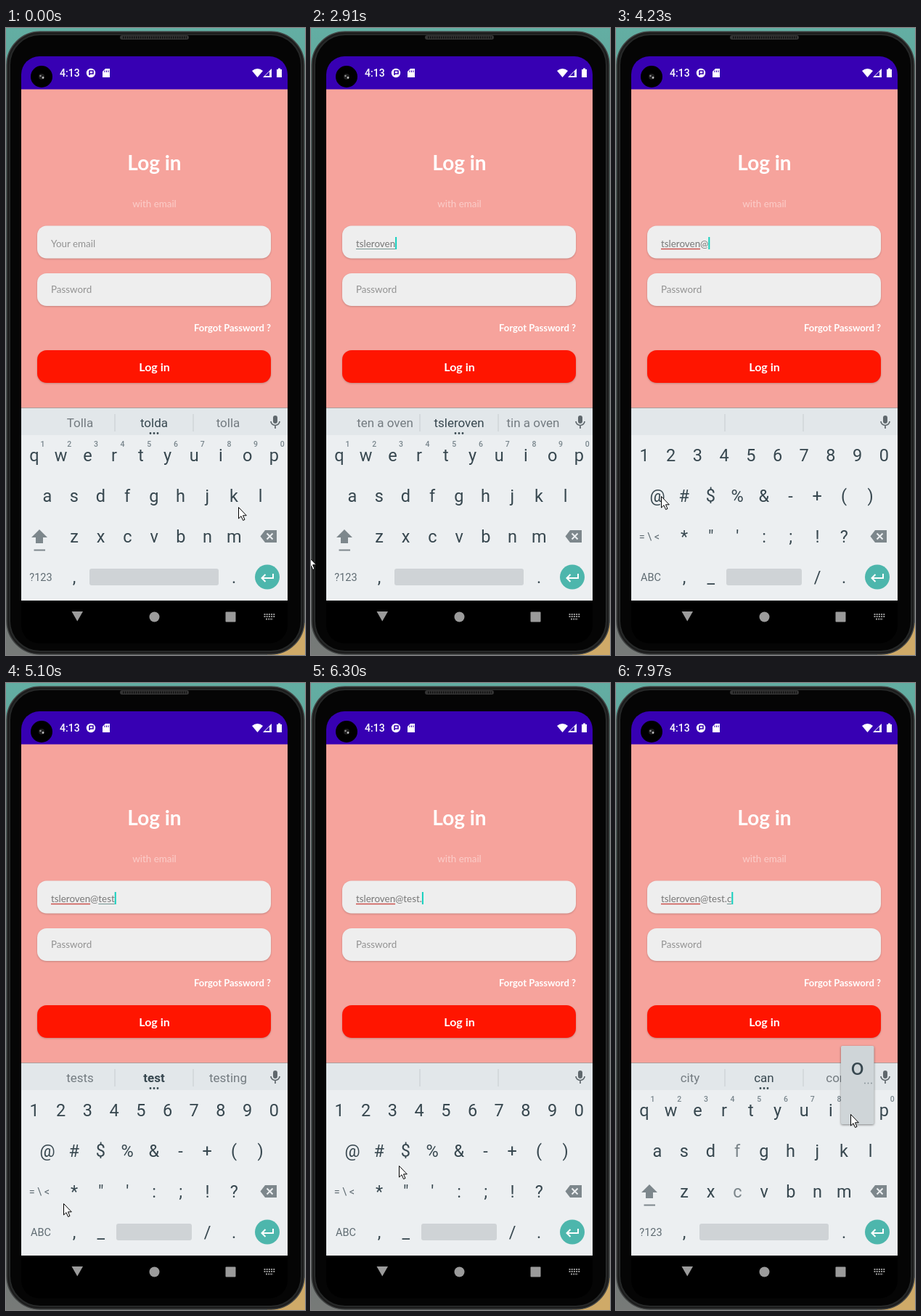
These frames come from a looping animation (412 by 864 pixels, 8 s). An HTML page:

```html
<!DOCTYPE html>
<html lang="en">
<head>
<meta charset="utf-8">
<title>Log in</title>
<style>
  html, body { margin: 0; width: 100%; height: 100%; overflow: hidden; background: #000; }
  svg { display: block; width: 412px; height: 864px; }
  text { font-family: Roboto, sans-serif; white-space: pre; }
  .form text { font-family: Lato, sans-serif; font-size: 13.4px; }
  .mid { text-anchor: middle; }
  .key { font-size: 23.5px; fill: #37474f; text-anchor: middle; }
  .hint { font-size: 10.5px; font-weight: 500; fill: #78858c; text-anchor: middle; }
  .small { font-size: 14.5px; fill: #5f6b72; text-anchor: middle; }
  .sugg { font-size: 17px; fill: #737b80; text-anchor: middle; }
  .field { fill: #eee; filter: drop-shadow(0 1px 1px #0003); }
</style>
</head>
<body>
<svg viewBox="0 0 412 864">
  <defs>
    <linearGradient id="desk" x2="0" y2="1">
      <stop stop-color="#63aea3"/><stop offset=".6" stop-color="#5c7773"/><stop offset="1" stop-color="#777a78"/>
    </linearGradient>
    <clipPath id="screen"><rect x="21" y="39" width="367" height="809" rx="25"/></clipPath>
  </defs>

  <!-- desk and phone body -->
  <rect width="412" height="864" fill="url(#desk)"/>
  <path d="M360 820H412V864H360Z" fill="#cfaa68"/>
  <rect x="1" y="5" width="410" height="858" rx="46" fill="#1c1c1c" stroke="#414444" stroke-width="1.5"/>
  <rect x="5" y="9" width="402" height="850" rx="42" fill="#050505" stroke="#262828" stroke-width="2"/>
  <rect x="157" y="10" width="95" height="6" rx="3" fill="#333"/>
  <path d="M161 13H249" stroke="#111" stroke-width="3" stroke-dasharray="1.5 1.5"/>

  <g clip-path="url(#screen)">
    <rect x="21" y="39" width="367" height="809"/>
    <rect x="21" y="39" width="367" height="46" fill="#3700b3"/>
    <rect x="21" y="84.5" width="367" height="439" fill="#f6a39c"/>
    <rect x="21" y="523.5" width="367" height="38" fill="#e2e7ea"/>
    <rect x="21" y="561" width="367" height="228" fill="#eceff1"/>
  </g>

  <!-- status bar -->
  <circle cx="49" cy="67" r="15"/>
  <circle cx="49" cy="67" r="4" fill="#1f1f1f"/>
  <circle cx="47.500" cy="66" r="1.200" fill="#999"/>
  <circle cx="51" cy="68.500" r="1.400" fill="#bbb"/>
  <g fill="#fff">
    <text x="74" y="67" font-size="14" font-weight="500">4:13</text>
    <circle cx="117" cy="62" r="6.200"/>
    <path d="M137 56H143V68H133V60Z"/>
    <path d="M339 59Q346.500 53 354 59L346.500 68Z"/>
    <path d="M366 56V68H354Z"/>
    <path d="M375 55.500H378V57H380V68H373V57H375Z"/>
  </g>
  <path d="M115 58.500V65M115 59H120V63H115" fill="none" stroke="#3700b3" stroke-width="1.600"/>
  <path d="M136 58.500V61M138.500 58.500V61M141 58.500V61" stroke="#3700b3"/>
  <path d="M363 60V66H357Z" fill="#3700b3"/>

  <g class="form">
    <text class="mid" x="204.500" y="196" fill="#fff" style="font-size:28px;font-weight:700">Log in</text>
    <text class="mid" x="204.500" y="247" fill="#fbcdc9">with email</text>
    <rect class="field" x="43" y="272.500" width="322" height="45" rx="13"/>
    <rect class="field" x="43" y="338" width="322" height="45" rx="13"/>
    <text id="email" x="62" y="302"></text>
    <path id="spell" stroke="#c9504c" stroke-width="1.500"/>
    <path id="compose" stroke="#71918e"/>
    <rect id="caret" y="288" width="2" height="17" fill="#13cfbd"/>
    <text x="62" y="365" fill="#929292">Password</text>
    <text x="365" y="418" fill="#fff" text-anchor="end" style="font-size:13px;font-weight:700">Forgot Password ?</text>
    <rect class="field" x="43" y="444" width="322" height="45" rx="13" style="fill:#ff1500"/>
    <text class="mid" x="204.500" y="473" fill="#fff" style="font-size:16px;font-weight:700">Log in</text>
  </g>

  <!-- suggestion strip -->
  <path d="M150 532V556M258 532V556" stroke="#c6cccf"/>
  <text class="sugg" x="102" y="550"></text>
  <text class="sugg" x="204" y="550" style="fill:#37474f"></text>
  <text class="sugg" x="306" y="550"></text>
  <path id="dots" d="M199 558.500h0m5 0h0m5 0h0" stroke="#37474f" stroke-width="2.800" stroke-linecap="round"/>
  <rect x="368" y="534" width="6" height="11" rx="3" fill="#5f686d"/>
  <path d="M365 542a6 5.500 0 0 0 12 0M371 547.500V552" fill="none" stroke="#5f686d" stroke-width="1.700"/>

  <g id="letters"></g>
  <g id="symbols"></g>

  <!-- keys on both layouts -->
  <path d="M357 692H373V709H357L350.500 700.500Z" fill="#7d878c"/>
  <path d="M359.500 696.500l8 8m0-8l-8 8" stroke="#eceff1" stroke-width="2"/>
  <circle cx="360" cy="756.500" r="17" fill="#4db6ac"/>
  <path d="M368 752V758H353M357.500 753L352.500 758L357.500 763" fill="none" stroke="#fff" stroke-width="2"/>

  <!-- navigation bar -->
  <g fill="#9b9b9b">
    <path d="M90.500 804H106L98.250 817.500Z"/>
    <circle cx="204.500" cy="811.500" r="7"/>
    <rect x="302.500" y="804.500" width="14" height="14" rx="1"/>
    <path d="M355.500 808H370.500M355.500 811H370.500M358 814.500H368" stroke="#9b9b9b" stroke-width="1.800" stroke-dasharray="2 1.200"/>
  </g>

  <g id="popup">
    <rect x="-22.500" y="-89" width="45.500" height="108" rx="2" fill="#cfd5d8" style="filter:drop-shadow(0 1px 1.500px #0007)"/>
    <text class="key" y="-49" style="font-size:32px"></text>
    <path d="M10.500 -37.500h0m4.500 0h0m4.500 0h0" stroke="#849096" stroke-width="1.800" stroke-linecap="round"/>
  </g>
  <path id="pointer" d="M.5 .5V16L4 12.700L6.600 18.500L9 17.400L6.500 11.800H11.300Z" fill="#fff" stroke="#000"/>
</svg>

<script>
const LOOP = 8000, PITCH = 36.7;
const $ = id => document.getElementById(id);
const safe = s => s.replace(/&/g, '&amp;').replace(/</g, '&lt;');
const label = (cls, x, y, s) => `<text class="${cls}" x="${x}" y="${y}">${safe(s)}</text>`;
const row = (chars, x, y, cls = 'key') =>
  [...chars].map((c, i) => label(cls, x + i * PITCH, y, c)).join('');
const space = (x, w) => `<rect x="${x}" y="745" width="${w}" height="23" rx="3" fill="#cfd3d6"/>`;

$('letters').innerHTML = row('qwertyuiop', 39, 597) + row('1234567890', 50.5, 577, 'hint') +
  row('asdfghjkl', 57, 653) + row('zxcvbnm', 94, 709) + label('small', 48, 762, '?123') +
  row(',', 94, 765) + row('.', 314, 765) + space(115, 178) +
  '<path d="M46 691L57 702H51V710H41V702H35Z" fill="#7d878c"/>' +
  '<path d="M38.500 719.500H54" stroke="#7d878c" stroke-width="2"/>';
$('symbols').innerHTML = row('1234567890', 39, 597) + row('@#$%&-+()', 57, 653) +
  row('*"\':;!?', 94, 709) + label('small', 46, 706, '= \\ <') + label('small', 48, 762, 'ABC') +
  row(',_', 94, 765) + row('/.', 277.5, 765) + space(152, 104);

// Typing: [time, text or null to keep it, suggestions or null to keep them]
const NAME = 'tsleroven';
const events = [[0, '', 'Tolla|tolda|tolla'], [720, '', '||']];
const guesses = ['I|t|the', 'TS|ts|its', 'TSL|tsl|tel', 'tale|tsle|tile', 'taller|tsler|tiler',
  'tale to|tslero|tiler o', 'tale of|tslerov|tiler of', 'ten love|tslerove|tin love',
  'ten a oven|tsleroven|tin a oven'];
[930, 1120, 1320, 1520, 1720, 1900, 2060, 2210, 2370].forEach((t, i) =>
  events.push([t, NAME.slice(0, i + 1), null], [t + 140, null, guesses[i]]));
events.push([4080, NAME + '@', '||']);
['to|t|the', 'tell|te|Ted', 'yes|tes|test', 'tests|test|testing'].forEach((s, i) =>
  events.push([4490 + i * 130, NAME + '@' + 'test'.slice(0, i + 1), null], [4580 + i * 130, null, s]));
events.push([5880, NAME + '@test.', '||'], [7470, NAME + '@test.c', null], [7610, null, 'city|can|com']);
events.sort((a, b) => a[0] - b[0]);

// Held keys: [from, to, letter, x, y]
const presses = [[3970, 4080, '@', 57, 645], [5760, 5880, '.', 314, 757],
  [7370, 7470, 'c', 167.5, 701], [7800, LOOP, 'o', 332.5, 589]];

// Pointer: [time, x, y]
const path = [[0, 320, 660], [70, 318, 650], [470, 118, 243], [720, 115, 299], [2720, 115, 299],
  [2910, -4, 728], [3020, 10, 785], [3240, 46, 762], [3360, 50, 757], [3630, 130, 606],
  [3930, 62, 645], [4650, 62, 645], [5100, 79, 717], [5230, 88, 722], [5680, 310, 758],
  [5880, 311, 758], [6300, 121, 665], [6620, 46, 766], [6950, 46, 766], [7040, 55, 745],
  [7340, 168, 703], [7470, 169, 703], [7630, 318, 600], [7770, 323, 594], [LOOP, 323, 594]];

const email = $('email'), tips = document.querySelectorAll('.sugg');
const faded = [...document.querySelectorAll('#letters .key')].filter(k => 'fc'.includes(k.textContent));
const show = (el, on) => el.setAttribute('visibility', on ? 'visible' : 'hidden');
const widthTo = n => n ? email.getSubStringLength(0, n) : 0;
const underline = (id, a, b) =>
  $(id).setAttribute('d', b > a ? `M${62 + widthTo(a)} 304.500H${62 + widthTo(b)}` : '');

function pointerAt(t) {
  const i = path.findIndex(p => p[0] > t);
  const [t0, x0, y0] = path[i - 1], [t1, x1, y1] = path[i];
  const u = (t - t0) / (t1 - t0), k = u * u * (3 - 2 * u);
  return [x0 + (x1 - x0) * k, y0 + (y1 - y0) * k];
}

function draw(t) {
  let text = '', sugg = '', last = 0;
  for (const [at, typed, words] of events) {
    if (at > t) break;
    text = typed ?? text;
    sugg = words ?? sugg;
    last = at;
  }

  email.textContent = text || 'Your email';
  email.setAttribute('fill', text ? '#777' : '#929292');
  const word = text.match(/[a-z]*$/)[0];
  underline('spell', 0, text.includes('@') ? NAME.length : 0);
  underline('compose', text.length > 4 ? text.length - word.length : text.length, text.length);
  $('caret').setAttribute('x', 62 + widthTo(text.length));
  show($('caret'), t >= 720 && (t - last) % 1000 < 500);

  const words = sugg.split('|');
  tips.forEach((el, i) => el.textContent = words[i]);
  tips[1].setAttribute('font-weight', words[1] === 'test' ? 700 : 400);
  show($('dots'), words[1]);

  const symbols = t >= 3300 && t < 6750;
  show($('symbols'), symbols);
  show($('letters'), !symbols);
  faded.forEach(k => k.style.fill = t >= 7470 ? '#7b858a' : '');

  const press = presses.find(p => t >= p[0] && t < p[1]);
  show($('popup'), press);
  if (press) {
    $('popup').setAttribute('transform', `translate(${press[3]} ${press[4]})`);
    $('popup').querySelector('text').textContent = press[2];
  }
  $('pointer').setAttribute('transform', `translate(${pointerAt(t)})`);
}

function tick() {
  draw(performance.now() % LOOP);
  requestAnimationFrame(tick);
}
tick();
</script>
</body>
</html>
```
